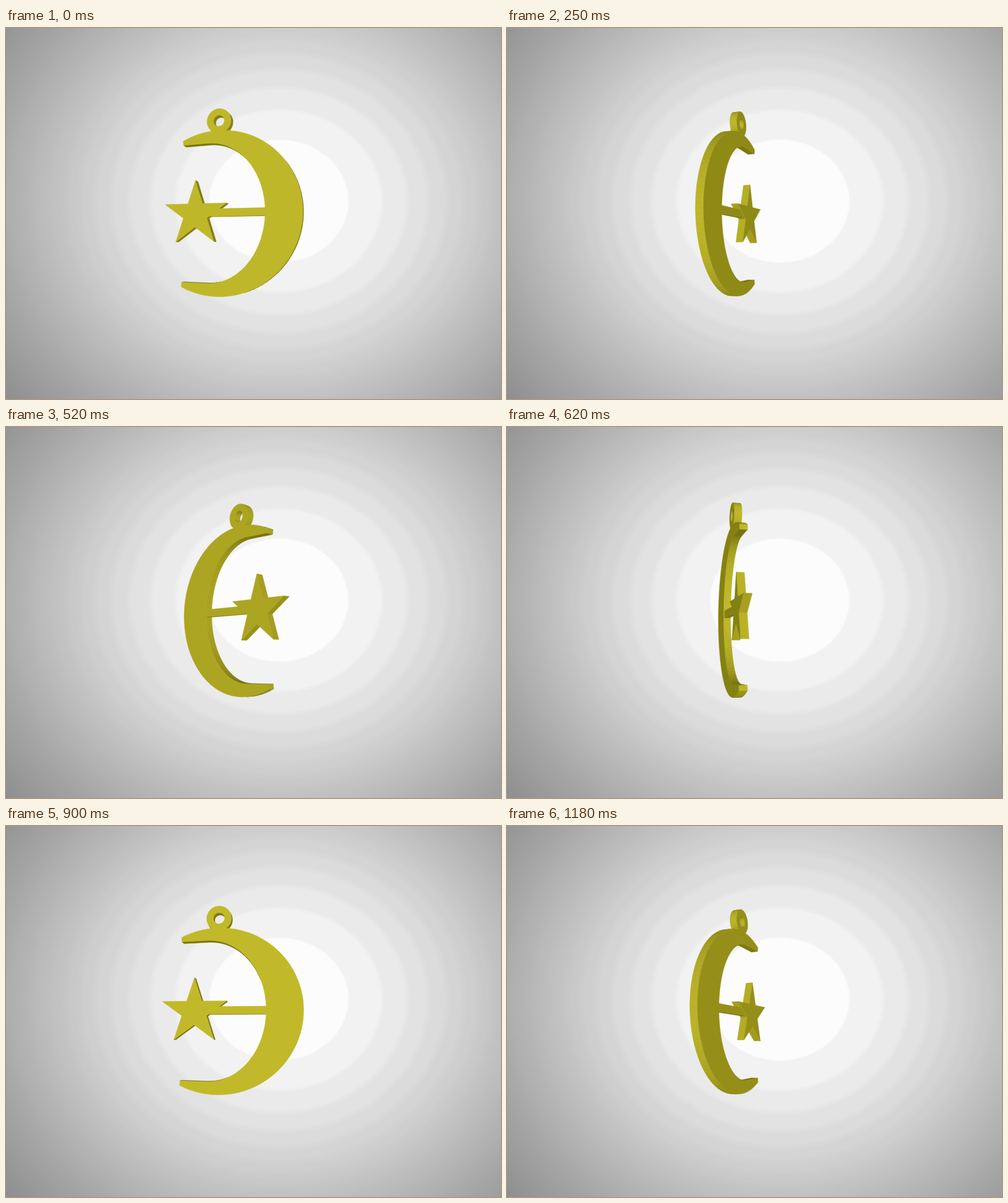
Recreate the animation shown at these times as an HTML page with a canvas. Size 800 by 600 pixels, loop 1.23 s.

```html
<!DOCTYPE html>
<html lang="en">
<head>
<meta charset="utf-8">
<title>Crescent pendant</title>
<style>
  html, body { margin: 0; width: 100%; height: 100%; overflow: hidden; }
  canvas { position: absolute; left: 0; top: 0; }
</style>
</head>
<body>
<canvas id="back" width="800" height="600"></canvas>
<canvas id="stage" width="800" height="600"></canvas>
<script>
const context = id => document.getElementById(id).getContext('2d');
const ctx = context('stage');
const RAD = Math.PI / 180;
const LOOP = 1230, STEPS = 26, LEAD = 20;
// The turntable's slightly uneven spin: [step, degrees]
const SPIN = [[0, 12.5], [4, 92], [11, 223], [16, 307.6], [22, 422], [25, 475.3]];

// Camera
const DIST = 724, AXIS = -35, SIN_P = 0.09, COS_P = Math.sqrt(1 - SIN_P * SIN_P);

// Light falls off with the squared radius; its bands blur outwards
function drawBackdrop() {
  const c = context('back'), size = 560;
  const radius = n => Math.sqrt(Math.max(0, 9604 + 12000 * n));
  const glow = c.createRadialGradient(0, 0, 0, 0, 0, size);
  for (let n = 0; radius(n) < size; n++) {
    const inner = n ? radius(n - 1) : 0, outer = radius(n);
    const mid = (inner + outer) / 2;
    const flat = (outer - inner) / 2 * Math.max(0, 1 - n / 9);
    const level = Math.round(255 / (1 + (mid * mid + 2000) / 325000));
    const color = `rgb(${level},${level},${level})`;
    glow.addColorStop((mid - flat) / size, color);
    glow.addColorStop((mid + flat) / size, color);
  }
  c.translate(441, 280);
  c.scale(1.13, 1);
  c.fillStyle = glow;
  c.fillRect(-400, -300, 800, 640);
}

// Outlines run counterclockwise, holes clockwise
function arc(cu, cv, ru, rv, from, to, n) {
  return Array.from({ length: n + 1 }, (_, i) => {
    const a = (from + (to - from) * i / n) * RAD;
    return [cu + ru * Math.cos(a), cv + rv * Math.sin(a)];
  });
}

function starShape(cu, cv, r) {
  return Array.from({ length: 10 }, (_, i) => {
    const k = i % 2 ? r * 0.382 : r, a = (90 + 36 * i) * RAD;
    return [cu + k * Math.cos(a), cv + k * Math.sin(a)];
  });
}

const slab = (half, ...loops) => ({ half, loops });

const star = slab(6.2, starShape(-60.5, -0.4, 55.5));
const crescent = slab(6.2, [
  ...arc(-21, 2, 136.3, 134.8, -117, 117, 72),
  [-82, 115],
  ...arc(-37, 2, 93, 114.3, 90, -90, 48),
  [-82, -111]
]);
const ring = slab(6.2,
  arc(-21, 153, 20.5, 20.5, 0, 360, 40),
  arc(-21, 153, 9.3, 9.3, 360, 0, 28));
const bar = slab(4, [[-38, -4.3], [58, -4.3], [58, 8], [-21, 8]]);

let sin = 0, cos = 1;

function rotate(u, v, w) {
  const z = u * sin + w * cos;
  return [u * cos - w * sin, v * COS_P + z * SIN_P, z * COS_P - v * SIN_P];
}

function place(u, v, w) {
  const [x, y, z] = rotate(u, v, w);
  return [x + AXIS, y, z - DIST];
}

const facing = (n, p) => n[0] * p[0] + n[1] * p[1] + n[2] * p[2] < 0;

function shade(n) {
  const k = Math.abs(n[2]);
  return `rgb(${116 + 78 * k | 0},${111 + 75 * k | 0},${12 + 31 * k | 0})`;
}

function fill(loops, color, edge) {
  ctx.beginPath();
  for (const loop of loops) {
    loop.forEach(([x, y, z], i) => {
      const s = -DIST / z;
      ctx[i ? 'lineTo' : 'moveTo'](400 + x * s, 300 - y * s);
    });
    ctx.closePath();
  }
  ctx.fillStyle = ctx.strokeStyle = color;
  ctx.lineWidth = edge;
  ctx.fill('evenodd');
  ctx.stroke();
}

function drawWalls({ loops, half }) {
  const walls = [];
  for (const loop of loops) {
    loop.forEach(([u, v], i) => {
      const [u2, v2] = loop[(i + 1) % loop.length];
      const len = Math.hypot(u2 - u, v2 - v);
      if (len < 0.01) return;
      const n = rotate((v2 - v) / len, (u - u2) / len, 0);
      const quad = [place(u, v, half), place(u2, v2, half), place(u2, v2, -half), place(u, v, -half)];
      if (facing(n, quad[0])) {
        walls.push({ quad, n, depth: quad.reduce((sum, p) => sum + p[2], 0) });
      }
    });
  }
  walls.sort((a, b) => a.depth - b.depth);
  for (const { quad, n } of walls) fill([quad], shade(n), 0.6);
}

function drawFace({ loops, half }) {
  for (const side of [1, -1]) {
    const n = rotate(0, 0, side);
    if (!facing(n, place(0, 0, side * half))) continue;
    fill(loops.map(loop => loop.map(([u, v]) => place(u, v, side * half))), shade(n), 0.4);
  }
}

function turnAt(time) {
  const step = Math.min(STEPS - 1, Math.floor((time + LEAD) * STEPS / LOOP));
  const i = Math.max(1, SPIN.findIndex(k => k[0] >= step));
  const [s0, a0] = SPIN[i - 1], [s1, a1] = SPIN[i];
  return a0 + (a1 - a0) * (step - s0) / (s1 - s0);
}

function draw() {
  const a = turnAt(performance.now() % LOOP) * RAD;
  sin = Math.sin(a);
  cos = Math.cos(a);
  ctx.clearRect(0, 0, 800, 600);
  // Far to near: the bar joins the star to the moon
  const layers = [
    () => drawWalls(star),
    () => { drawWalls(bar); drawFace(bar); },
    () => { drawWalls(ring); drawWalls(crescent); }
  ];
  if (sin < 0) layers.reverse();
  layers.forEach(paint => paint());
  [ring, crescent, star].forEach(drawFace);
  requestAnimationFrame(draw);
}

drawBackdrop();
draw();
</script>
</body>
</html>
```
